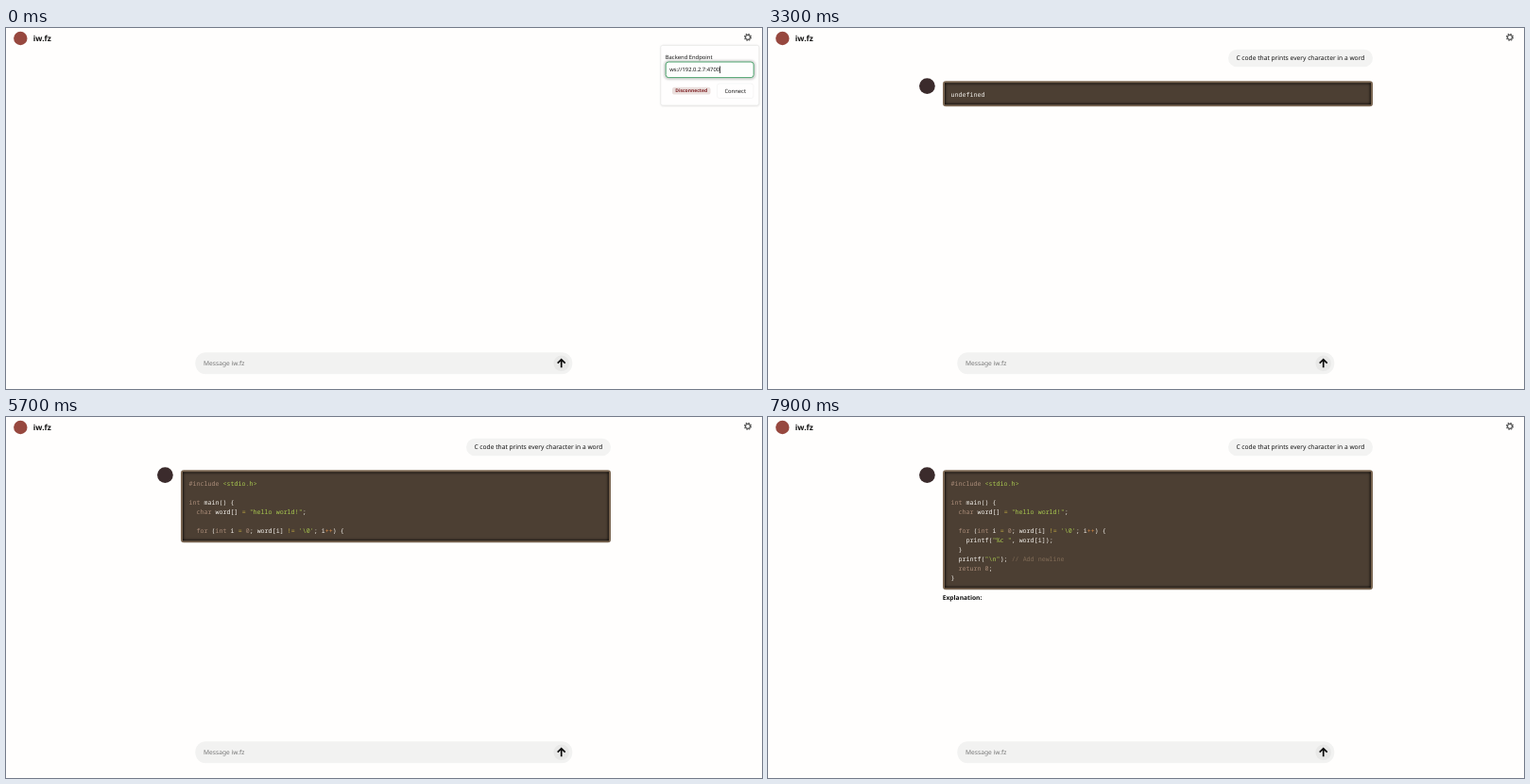
An HTML page for the animation above (8 s loop, 800 by 383 pixels).

```html
<!DOCTYPE html>
<html lang="en">
<head>
<meta charset="utf-8">
<title>Chat</title>
<style>
html, body { margin: 0; width: 100%; height: 100%; overflow: hidden; background: #fffefd; }
svg.stage { display: block; width: 100vw; height: 100vh; }
text { font-family: "Noto Sans", sans-serif; font-size: 6.67px; fill: #111; white-space: pre; text-rendering: geometricPrecision; }
.small { font-size: 5.83px; }
.bold { font-weight: 700; }
.hint { fill: #777; }
#code text { font-family: "Noto Sans Mono", monospace; fill: #f1eee9; }
#code .k { fill: #a98b78; }
#code .s { fill: #a8c84f; }
#code .o { fill: #c0a840; }
#code .p { fill: #d98a45; }
#code .c { fill: #806b56; }
</style>
</head>
<body>
<svg class="stage" viewBox="0 0 800 383">
  <defs>
    <filter id="blur" x="-20%" y="-20%" width="140%" height="140%"><feGaussianBlur stdDeviation="1.5"/></filter>
    <filter id="soft" x="-10%" y="-30%" width="120%" height="160%"><feGaussianBlur stdDeviation="1.2"/></filter>
  </defs>
  <rect width="800" height="383" fill="#fffefd"/>

  <circle cx="15.3" cy="11" r="7.2" fill="#97483f"/>
  <text class="bold" x="28.8" y="13.7" style="font-size:8.33px">iw.fz</text>
  <g fill="none" stroke="#555">
    <circle cx="785" cy="9.8" r="2.5" stroke-width="1.2"/>
    <circle cx="785" cy="9.8" r="3.5" stroke-width="1.1" stroke-dasharray="1.45 1.3"/>
  </g>

  <g id="panel">
    <rect x="693" y="18.8" width="104" height="64" rx="2" fill="#999" opacity=".3" filter="url(#soft)"/>
    <rect x="692.8" y="18.4" width="104" height="63.6" rx="2" fill="#fffefe" stroke="#e4e4e3" stroke-width=".6"/>
    <text class="small" x="697.8" y="32.8">Backend Endpoint</text>
    <g id="ring">
      <rect x="697.5" y="35.6" width="94.5" height="18" rx="3.5" fill="none" stroke="#777" stroke-width="2" opacity=".45" filter="url(#soft)"/>
    </g>
    <rect id="field" x="698.2" y="36" width="93" height="16.6" rx="3" fill="#fdfefd" stroke-width=".9"/>
    <text class="small" id="address" x="702.2" y="46.3">ws://192.0.2.7:4700</text>
    <rect id="addressCaret" y="40.5" width=".8" height="7.5" fill="#111"/>
    <rect id="badge" x="705" y="62.8" width="40.5" height="7.8" rx="2.6"/>
    <text class="bold" id="status" x="725.2" y="68.4" text-anchor="middle" style="font-size:5px"></text>
    <rect x="752.5" y="59" width="38.5" height="15.5" rx="2.5" fill="none" stroke="#f3f3f2" stroke-width=".7"/>
    <text class="small" x="771.7" y="68.7" text-anchor="middle">Connect</text>
  </g>

  <g id="sent">
    <rect x="487" y="22.8" width="153" height="18.4" rx="9.2" fill="#f3f3f2"/>
    <text id="sentText" x="495.4" y="34.2"></text>
    <circle cx="168.4" cy="61.6" r="8.4" fill="#3b2b2c"/>
  </g>
  <circle id="loader" cx="191" cy="63" r="3.8" fill="#555"/>

  <g id="code">
    <rect id="frame" x="185" y="56.3" width="455" rx="3.2" fill="#7a6652"/>
    <svg id="inner" x="187" y="58.3" width="451">
      <rect width="451" height="200" fill="#4c3f33"/>
      <rect id="shade" x="-1.6" y="-1.6" width="454.2" fill="none" stroke="#000" stroke-width="4" rx="2" filter="url(#blur)"/>
    </svg>
    <text id="empty" x="193.6" y="72.5">undefined</text>
    <g id="tokens"></g>
  </g>
  <text id="answer" x="184.8" y="194.2"></text>

  <rect x="200.3" y="344.3" width="399" height="22.9" rx="11" fill="#f2f2f1"/>
  <text id="draft" x="209" y="358.2"></text>
  <rect id="caret" y="351" width=".8" height="9.4" fill="#111"/>
  <circle id="send" cx="587.7" cy="355.8" r="8.3"/>
  <path d="M587.7 360.2V351.8M583.7 355.6L587.7 351.6L591.7 355.6" fill="none" stroke="#0a0a0a" stroke-width="1.7"/>
</svg>
<script>
const LOOP = 8000;
const PROMPT = 'C code that prints every character in a word';
const CONNECT = 300, CLOSE = 600, TYPE = 750, KEY = 22.5, SEND = 1790, REPLY = 3000;

// Each line: row, first and last token time, tokens with their colour class in front.
const LINES = [
  [0, 3380, 3700, ['k#include', 's <', 'sstdio', 's.h', 's>']],
  [2, 3780, 3980, ['kint', 'w main', 'w()', 'w {']],
  [3, 4050, 4600, ['k  char', 'w word', 'w[]', 'o =', 's "hello', 's world', 's!"', 'w;']],
  [5, 4680, 5600, ['k  for', 'w (', 'kint', 'w i', 'o =', 'k 0', 'w;', 'w word', 'w[i]', 'o !=', "s '\\0'", 'w;', 'w i', 'p++', 'w) {']],
  [6, 5750, 6200, ['w    printf', 'w(', 's"%c', 's "', 'w,', 'w word', 'w[i', 'w]);']],
  [7, 6400, 6400, ['w  }']],
  [8, 6450, 6850, ['w  printf', 'w(', 's"\\n"', 'w);', 'c //', 'c Add', 'c newline']],
  [9, 6950, 7200, ['k  return', 'k 0', 'w;']],
  [10, 7300, 7300, ['w}']]
];

const $ = id => document.getElementById(id);
const show = (el, on) => el.setAttribute('display', on ? 'inline' : 'none');
const set = (el, attrs) => { for (const k in attrs) el.setAttribute(k, attrs[k]); };
const write = (el, s) => { if (el.textContent !== s) el.textContent = s; };

const tokens = [];
for (const [row, start, end, parts] of LINES) {
  let col = 0;
  parts.forEach((part, i) => {
    const el = document.createElementNS('http://www.w3.org/2000/svg', 'text');
    const body = part.slice(1), pad = body.length - body.trimStart().length;
    set(el, { x: 193.6 + (col + pad) * 4.002, y: 72.5 + row * 10, class: part[0] });
    el.textContent = body.trimStart();
    col += body.length;
    $('tokens').append(el);
    tokens.push({ el, at: start + (end - start) * i / Math.max(1, parts.length - 1) });
  });
}
$('sentText').textContent = PROMPT;

function drawPanel(t) {
  const open = t < CLOSE, linked = t >= CONNECT;
  show($('panel'), open);
  if (!open) return;
  show($('ring'), !linked);
  show($('addressCaret'), !linked);
  $('addressCaret').setAttribute('x', 702.4 + $('address').getComputedTextLength());
  $('field').setAttribute('stroke', linked ? '#d8d8d7' : '#3d9c60');
  $('badge').setAttribute('fill', linked ? '#dcefdf' : '#eadfdd');
  $('status').setAttribute('fill', '#000');
  $('status').style.fill = linked ? '#1f6b35' : '#7d1f22';
  write($('status'), linked ? 'Connected' : 'Disconnected');
}

function drawInput(t) {
  const n = t < SEND ? Math.max(0, Math.min(PROMPT.length, Math.floor((t - TYPE) / KEY))) : 0;
  const draft = $('draft');
  write(draft, n ? PROMPT.slice(0, n) : 'Message iw.fz');
  draft.setAttribute('class', n ? '' : 'hint');
  $('send').setAttribute('fill', n ? '#5fd95f' : '#e8e8e7');
  show($('caret'), t >= CLOSE && (t < 1300 || (t - 100) % 1200 < 600));
  $('caret').setAttribute('x', 209 + (n ? draft.getComputedTextLength() : 0));
}

function drawReply(t) {
  show($('sent'), t >= SEND);
  show($('loader'), t >= SEND && t < REPLY);
  $('loader').setAttribute('opacity', 0.75 + 0.25 * Math.cos((t - 1900) / 1000 * Math.PI));
  show($('code'), t >= REPLY);
  show($('empty'), t < LINES[0][1]);
  let rows = 1;
  for (const [row, start] of LINES) if (t >= start) rows = row + 1;
  const h = 12.9 + rows * 10;
  $('frame').setAttribute('height', h + 4);
  $('inner').setAttribute('height', h);
  $('shade').setAttribute('height', h + 3.2);
  for (const k of tokens) show(k.el, t >= k.at);
  const answer = $('answer');
  answer.setAttribute('class', t >= 7800 ? 'bold' : '');
  write(answer, t < 7500 ? '' : t < 7600 ? '**' : t < 7700 ? '**Explan' : t < 7800 ? '**Explanation' : 'Explanation:');
}

function draw(now) {
  const t = now % LOOP;
  drawPanel(t);
  drawInput(t);
  drawReply(t);
}

let begin;
function tick(now) {
  begin ??= now;
  draw(now - begin);
  requestAnimationFrame(tick);
}
draw(0);
requestAnimationFrame(tick);
</script>
</body>
</html>
```
